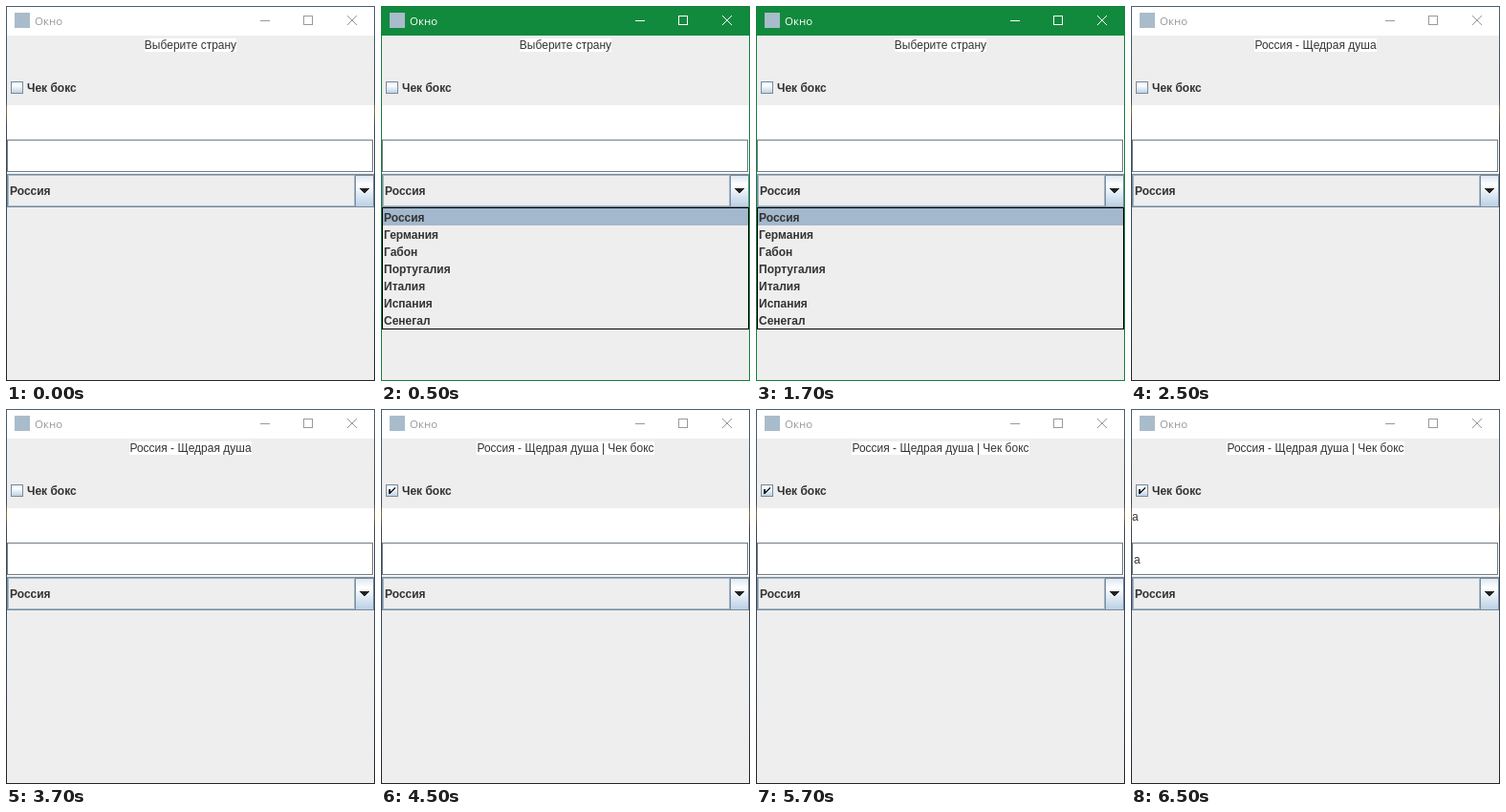
Animation, 386 px wide and 393 px high, one loop 8 s. Source, as an HTML page:

```html
<!DOCTYPE html>
<html lang="ru">
<head>
<meta charset="utf-8">
<title>Окно</title>
<style>
  html, body { margin: 0; width: 100%; height: 100%; overflow: hidden; }
  #app { position: relative; width: 386px; height: 393px; overflow: hidden; }
  svg { display: block; }
  text, #label { font: 12px "Liberation Sans", Arial, sans-serif; fill: #333; color: #333; white-space: pre; }
  .bold { font-weight: bold; }
  #title { font: 11.5px "Open Sans", "Noto Sans", sans-serif; }
  #label { position: absolute; left: 1px; top: 34px; width: 384px; text-align: center; line-height: 14px; }
  #label span { display: inline-block; height: 14px; background: #fff; }
</style>
</head>
<body>
<div id="app">
  <svg width="386" height="393" shape-rendering="crispEdges">
    <defs>
      <linearGradient id="metal" x2="0" y2="1">
        <stop stop-color="#dde8f3"/>
        <stop offset=".3" stop-color="#fff"/>
        <stop offset="1" stop-color="#b8cfe5"/>
      </linearGradient>
      <linearGradient id="edge" x2="0" y2="1">
        <stop stop-color="#485f70"/>
        <stop offset=".25" stop-color="#3d4c5b"/>
        <stop offset=".28" stop-color="#8c713c"/>
        <stop offset=".32" stop-color="#3d4650"/>
        <stop offset=".6" stop-color="#34495e"/>
        <stop offset="1" stop-color="#242326"/>
      </linearGradient>
    </defs>

    <rect id="frame" width="386" height="393"/>
    <rect id="bar" x="1" y="1" width="384" height="30"/>
    <rect x="1" y="31" width="384" height="361" fill="#eee"/>

    <rect x="9" y="7" width="16" height="16" fill="#a9bccb"/>
    <text id="title" x="30" y="20">Окно</text>
    <g id="controls" fill="none">
      <path d="M266 15.5h10M311.5 10.5h9v9h-9z"/>
      <path d="M357 10l10 10M367 10l-10 10" shape-rendering="auto"/>
    </g>

    <rect x="5.5" y="79.5" width="12" height="12" fill="url(#metal)" stroke="#7a8a99"/>
    <path id="check" d="M8 84h2v2h1v-1h1v-1h1v-1h1v-1h1v2h-1v1h-1v1h-1v1h-1v1h-1v1h-2z" fill="#222"/>
    <text class="bold" x="22" y="90">Чек бокс</text>

    <path d="M1 104h384v36H1z" fill="#fff"/>
    <rect x="1" y="140" width="384" height="35" fill="#fff"/>
    <rect x="1.5" y="140.5" width="382" height="33" fill="none" stroke="#737d87"/>
    <g id="typed">
      <text x="1" y="117">а</text>
      <text x="3" y="162">а</text>
    </g>

    <rect x="1.5" y="176.5" width="383" height="34" fill="#eee" stroke="#7a8a99"/>
    <rect x="2.5" y="177.5" width="362" height="32" fill="none" stroke="#a3b8cc"/>
    <rect x="365.5" y="177.5" width="19" height="33" fill="url(#metal)" stroke="#7a8a99"/>
    <path d="M370 191h10v1h-1v1h-1v1h-1v1h-1v1h-2v-1h-1v-1h-1v-1h-1v-1h-1z" fill="#222"/>
    <text class="bold" x="4" y="198">Россия</text>

    <g id="popup">
      <rect x="1.5" y="211.5" width="383" height="127" fill="#eee" stroke="#000"/>
      <rect x="2" y="212" width="382" height="18" fill="#a3b8cc"/>
    </g>
  </svg>
  <div id="label"><span></span></div>
</div>
<script>
const $ = id => document.getElementById(id);
const countries = ["Россия", "Германия", "Габон", "Португалия", "Италия", "Испания", "Сенегал"];
countries.forEach((name, i) => {
  const row = document.createElementNS("http://www.w3.org/2000/svg", "text");
  row.setAttribute("class", "bold");
  row.setAttribute("x", 3);
  row.setAttribute("y", 226 + 18 * i);
  row.textContent = name;
  $("popup").append(row);
});

const label = document.querySelector("#label span");
const show = (id, on) => $(id).style.display = on ? "" : "none";
const start = performance.now();

function draw() {
  const t = (performance.now() - start) % 8000;
  const open = t >= 500 && t < 2500;
  const checked = t >= 4500;
  const text = t < 2500 ? "Выберите страну"
    : "Россия - Щедрая душа" + (checked ? " | Чек бокс" : "");
  if (label.textContent !== text) label.textContent = text;

  $("frame").style.fill = open ? "#12803a" : "url(#edge)";
  $("bar").style.fill = open ? "#118a3e" : "#fff";
  $("title").style.fill = open ? "#fff" : "#999";
  $("controls").style.stroke = open ? "#fff" : "#999";
  show("popup", open);
  show("check", checked);
  show("typed", t >= 6500);
  requestAnimationFrame(draw);
}
draw();
</script>
</body>
</html>
```
